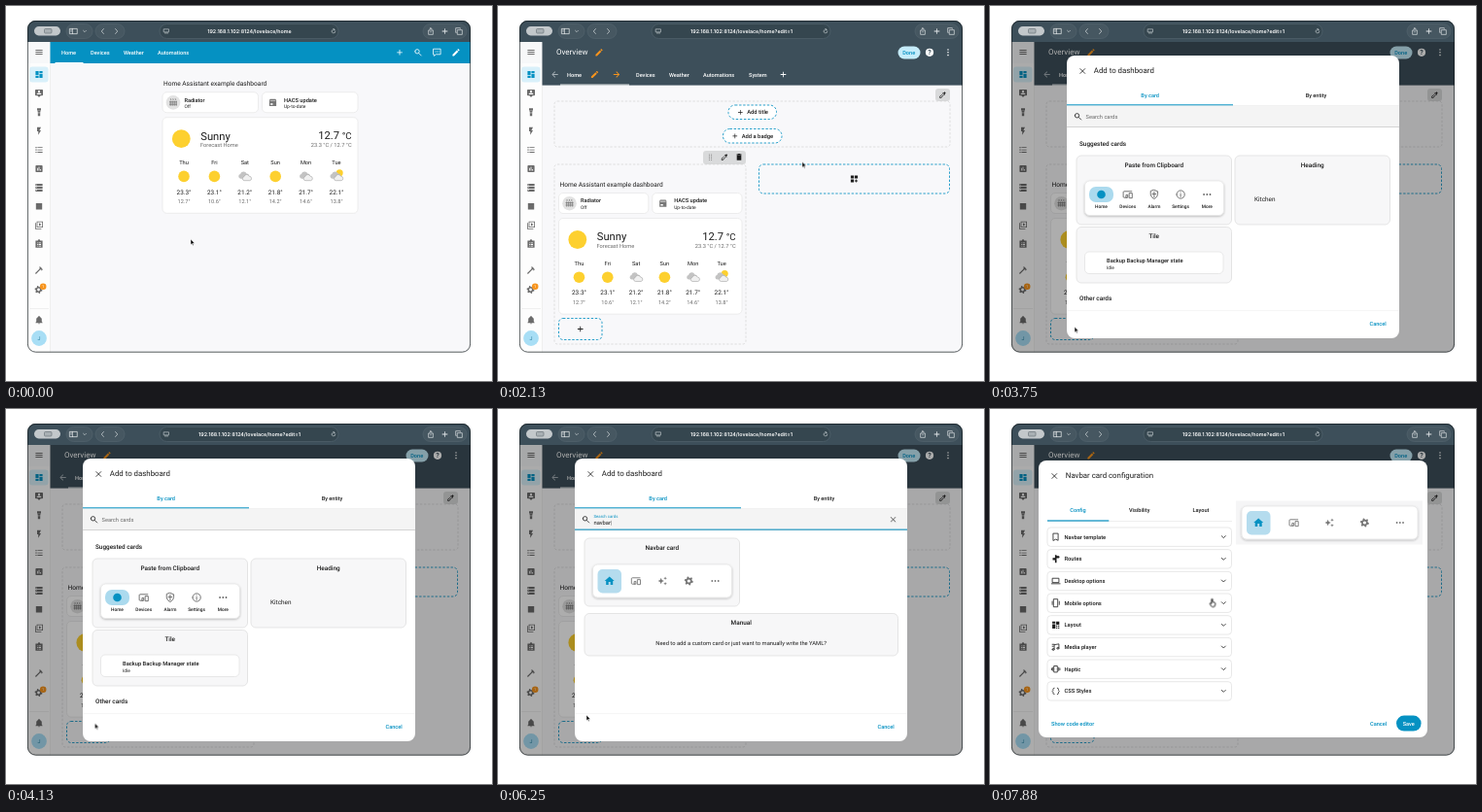
Animation, 500 px wide and 386 px high, one loop 8000 ms. Source, as an HTML page:

```html
<!DOCTYPE html>
<html lang="en">
<head>
<meta charset="utf-8">
<title>Dashboard editing</title>
<style>
html, body { margin: 0; width: 100%; height: 100%; overflow: hidden; background: #fff; }
svg { display: block; width: 500px; height: 386px; font-family: Roboto, sans-serif; text-rendering: geometricPrecision; }
.url { font-family: Inter, sans-serif; }
.line { fill: none; stroke-width: 2; stroke-linecap: round; stroke-linejoin: round; }
#pointer { animation: move 8s ease-in-out infinite; }
@keyframes move {
  0%, 3% { transform: translate(190px, 240px); }
  14.4%, 22% { transform: translate(464px, 46.5px); }
  32.5%, 46% { transform: translate(86.5px, 331px); }
  50%, 56% { transform: translate(91.5px, 323.5px); }
  60%, 78.7% { transform: translate(91px, 315px); }
  86.3%, 94% { transform: translate(182px, 176.5px); }
  98%, 100% { transform: translate(228.5px, 195.5px); }
}
</style>
</head>
<body>
<script>
const LOOP = 8000;
const BLUE = '#0591c2', DARK = '#3d4f5a', INK = '#1c1c1c', GRAY = '#6b6b6b', ORANGE = '#f7941d', SUN = '#fdd02f';
let css = '', rules = 0;

const gear = 'M' + Array.from({ length: 24 }, (_, i) => {
  const r = i % 4 < 2 ? 10 : 7.2, a = (i + .5) * Math.PI / 12;
  return (12 + r * Math.cos(a)).toFixed(2) + ' ' + (12 + r * Math.sin(a)).toFixed(2);
}).join('L') + 'ZM8.5 12a3.5 3.5 0 1 0 7 0a3.5 3.5 0 1 0-7 0Z';
const dots = (...spots) => spots.map(([x, y]) => `M${x - 2} ${y}a2 2 0 1 0 4 0a2 2 0 1 0-4 0Z`).join('');

const solid = {
  gear,
  dotsV: dots([12, 5], [12, 12], [12, 19]),
  dotsH: dots([5, 12], [12, 12], [19, 12]),
  menu: 'M3 6H21V8H3ZM3 11H21V13H3ZM3 16H21V18H3Z',
  board: 'M13 3V9H21V3ZM13 21H21V11H13ZM3 21H11V15H3ZM3 13H11V3H3Z',
  blocks: 'M3 3H11V11H3ZM13 3H21V11H13ZM3 13H11V21H3ZM16 13H18V16H21V18H18V21H16V18H13V16H16Z',
  person: 'M20 2A2 2 0 0 1 22 4V16A2 2 0 0 1 20 18H16L12 22 8 18H4A2 2 0 0 1 2 16V4A2 2 0 0 1 4 2ZM12 4.3a2.7 2.7 0 1 0 .01 0ZM18 15V14.1C18 12.1 14 11 12 11S6 12.1 6 14.1V15Z',
  torch: 'M7 2H17V6H7ZM7 7H17L15 11V22H9V11ZM11 12V15H13V12Z',
  flash: 'M7 2V13H10V22L17 10H13L17 2Z',
  list: 'M8 5H21V7H8ZM8 11H21V13H8ZM8 17H21V19H8ZM3 4.5H6V7.5H3ZM3 10.5H6V13.5H3ZM3 16.5H6V19.5H3Z',
  chart: 'M5 3H19A2 2 0 0 1 21 5V19A2 2 0 0 1 19 21H5A2 2 0 0 1 3 19V5A2 2 0 0 1 5 3ZM7 10V17H9V10ZM11 7V17H13V7ZM15 13V17H17V13Z',
  server: 'M3 2H21V8H3ZM5 4V6H7V4ZM3 9.5H21V15H3ZM5 11V13H7V11ZM3 16.5H21V22H3ZM5 18V20H7V18Z',
  square: 'M3 3H21V21H3Z',
  media: 'M2 6H4V20H18V22H2ZM6 2H22V18H6ZM8 4V16H20V4ZM12 6V14L18 10Z',
  clip: 'M9 3a3 3 0 0 1 6 0H21V21H3V3ZM7 8V10H9V8ZM11 8V10H17V8ZM7 12V14H9V12ZM11 12V14H17V12ZM7 16V18H9V16ZM11 16V18H17V16Z',
  hammer: 'M2 19.6 13.4 8.2 12.7 7.5 14.1 6.1 12 3.9C13.2 2.7 15.1 2.7 16.3 3.9L19.9 7.5 18.5 8.9H21.3L22 9.6 18.5 13.2 17.7 12.5V9.6L16.3 11 15.6 10.3 4.1 21.8Z',
  bell: 'M21 19V20H3V19L5 17V11C5 7.9 7 5.2 10 4.3V4A2 2 0 0 1 14 4V4.3C17 5.2 19 7.9 19 11V17ZM14 21A2 2 0 0 1 10 21Z',
  pencil: 'M20.7 7C21.1 6.6 21.1 6 20.7 5.6L18.4 3.3C18 2.9 17.4 2.9 17 3.3L15.1 5.1 18.9 8.9ZM3 17.3V21H6.8L17.8 9.9 14.1 6.2Z',
  pen: 'M14 8 16 10 7 19H5V17ZM17.7 3 14.4 6.3 13 4.9 11.6 6.3 13 7.7 3 16.2V21H7.8L16.4 11 17.8 12.4 19.2 11 17.8 9.6 21 6.4Z',
  plus: 'M19 13H13V19H11V13H5V11H11V5H13V11H19Z',
  right: 'M4 11V13H16L10.5 18.5 12 20 19.9 12 12 4 10.5 5.5 16 11Z',
  left: 'M20 11V13H8L13.5 18.5 12 20 4.1 12 12 4 13.5 5.5 8 11Z',
  house: 'M10 20V14H14V20H19V12H22L12 3 2 12H5V20Z',
  stars: 'M9 5 11 10 16 12 11 14 9 19 7 14 2 12 7 10ZM18.5 2 19.6 4.9 22.5 6 19.6 7.1 18.5 10 17.4 7.1 14.5 6 17.4 4.9ZM18.5 14 19.6 16.9 22.5 18 19.6 19.1 18.5 22 17.4 19.1 14.5 18 17.4 16.9Z',
  trash: 'M9 2H15L16 3.5H19V6H5V3.5H8ZM5.5 7H18.5V21H5.5Z',
  box: 'M5 3H19L21 6V21H3V6ZM5 6V7.5H19V6ZM6 14V18H12V14Z',
  sign: 'M10 2H14V4H20L22 7 20 10H14V22H10V15H4V9H10Z',
  grid: 'M3 3H11V8H3ZM13 3H21V11H13ZM3 10H11V21H3ZM13 13H16V16H13ZM18 13H21V16H18ZM13 18H16V21H13ZM18 18H21V21H18Z'
};
const line = {
  close: 'M6 6 18 18M18 6 6 18',
  down: 'M7 9.5 12 14.5 17 9.5',
  search: 'M4 9.5a5.5 5.5 0 1 0 11 0a5.5 5.5 0 1 0-11 0M14 14 20 20',
  chat: 'M3 3H21V17H9L4 21V17H3ZM8 10h.1M12 10h.1M16 10h.1',
  drag: 'M9 5v.1M15 5v.1M9 10v.1M15 10v.1M9 15v.1M15 15v.1M9 20v.1M15 20v.1',
  radiator: 'M3 11H21M5 9V20M10 9V20M15 9V20M20 9V20M3 17H21M6 3q2 2 0 3M12 3q2 2 0 3M18 3q2 2 0 3',
  devices: 'M9 19H4Q2 19 2 17V7Q2 5 4 5H21M16 9H22V20H16ZM9 13H12V19H9Z',
  shield: 'M12 2 20 5V11Q20 18 12 22 4 18 4 11V5ZM12 6V18M8 11H16',
  info: 'M3 12a9 9 0 1 0 18 0a9 9 0 1 0-18 0M12 11V17M12 7.5v.1',
  bookmark: 'M6 3H18V21L12 18 6 21Z',
  laptop: 'M4 5H20V16H4ZM1 19H23',
  phone: 'M7 2H17V22H7ZM3 8V16M21 8V16',
  music: 'M8 18V6L20 4V15M3 18a2.5 2.5 0 1 0 5 0a2.5 2.5 0 1 0-5 0M15 15a2.5 2.5 0 1 0 5 0a2.5 2.5 0 1 0-5 0M3 5H8M3 10H6',
  buzz: 'M8 4H16V20H8ZM4.5 8V16M19.5 8V16M1.5 10V14M22.5 10V14',
  braces: 'M8 4Q5 4 5 7V10L3 12 5 14V17Q5 20 8 20M16 4Q19 4 19 7V10L21 12 19 14V17Q19 20 16 20',
  panel: 'M2 5H22V19H2ZM9 5V19M5 9h1M5 12h1',
  back: 'M15 4 8 12 15 20',
  next: 'M9 4 16 12 9 20',
  reload: 'M19 12a7 7 0 1 1-3-6M12 2 16 6 12 9',
  share: 'M8 9H5V22H19V9H16M12 15V2M8 6 12 2 16 6',
  tabs: 'M8 8H22V22H8ZM4 16H2V2H16V4',
  page: 'M3 4H21V15H3ZM6 19H18'
};

const icon = (name, x, y, color = GRAY, size = 9.6) => {
  const at = `transform="translate(${x - size / 2} ${y - size / 2}) scale(${size / 24})"`;
  return solid[name]
    ? `<path ${at} d="${solid[name]}" fill="${color}" fill-rule="evenodd"/>`
    : `<path ${at} d="${line[name]}" class="line" stroke="${color}"/>`;
};
const text = (x, y, size, str, fill = INK, weight = 400, anchor = 'start', extra = '') =>
  `<text x="${x}" y="${y}" font-size="${size}" fill="${fill}" font-weight="${weight}" text-anchor="${anchor}" ${extra}>${str}</text>`;
const mid = (x, y, size, str, fill, weight) => text(x, y, size, str, fill, weight, 'middle');
const box = (x, y, w, h, r = 0, fill = 'none', stroke = 'none', extra = '') =>
  `<rect x="${x}" y="${y}" width="${w}" height="${h}" rx="${r}" fill="${fill}" stroke="${stroke}" stroke-width=".7" ${extra}/>`;
const dot = (x, y, r, fill) => `<circle cx="${x}" cy="${y}" r="${r}" fill="${fill}"/>`;
const dashed = (x, y, w, h, r, color = '#cfcfcf', fill = 'none') =>
  box(x, y, w, h, r, fill, color, `stroke-dasharray="2.4 1.7" style="stroke-width:${color === BLUE ? .85 : .6}px"`);

// Visible from one time to another, in ms
const show = (from, to, body, fade = 1, rise = 0) => {
  const id = 'on' + rules++, pct = ms => (ms / LOOP * 100).toFixed(4) + '%';
  const off = `{opacity:0;transform:translateY(${rise}px)}`, on = '{opacity:1;transform:none}';
  css += `@keyframes ${id}{` +
    (from ? `0%,${pct(from)}${off}${pct(from + fade)}` : '0%') +
    (to < LOOP ? `,${pct(to)}${on}${pct(to + fade)},100%${off}` : `,100%${on}`) + '}';
  return `<g style="animation:${id} 8s linear infinite">${body}</g>`;
};

const address = path => text(250.5, 28, 5.3, '192.168.1.102:8124/lovelace/' + path, '#fff', 600, 'middle', 'class="url"');

const cloud = (x, y, s, fill, stroke = 'none') =>
  `<path transform="translate(${x} ${y}) scale(${s})" d="M-4 4a2.8 2.8 0 0 1-.4-5.5 4 4 0 0 1 7.6-.6A3.1 3.1 0 0 1 4 4Z" fill="${fill}" stroke="${stroke}" stroke-width=".9"/>`;
const weather = (kind, x, y) => kind === 'sun' ? dot(x, y, 5.8, SUN) :
  (kind === 'mix' ? dot(x + 3.2, y - 3.6, 3.5, SUN) : '') + cloud(x - 1, y - 1, .85, '#c3c3c3') + cloud(x + 2.2, y + 1.4, .72, '#f0f0f0', '#a9a9a9');

const days = [
  ['Thu', 'sun', 23.3, 12.7], ['Fri', 'sun', 23.1, 10.6], ['Sat', 'cloud', 21.2, 12.1],
  ['Sun', 'sun', 21.8, 14.2], ['Mon', 'cloud', 21.7, 14.6], ['Tue', 'mix', 22.1, 13.8]
];

const cards = (x, y, w) => {
  const half = w / 2 - 2, x2 = x + w / 2 + 2, step = (w - 12.6) / 6, end = x + w - 6.3;
  const card = (cx, cy, cw, ch) => box(cx, cy, cw, ch, 4.5, '#fff', '#e6e6e6');
  return text(x + 1, y, 6.58, 'Home Assistant example dashboard') +
    card(x, y + 6.7, half, 21) + card(x2, y + 6.7, half, 21) +
    dot(x + 11, y + 17.4, 7.3, '#e2e2e2') + icon('radiator', x + 11, y + 17.2, '#777') + icon('box', x2 + 11, y + 17.4, '#777') +
    text(x + 22.4, y + 16.6, 5.6, 'Radiator', INK, 500) + text(x + 22.4, y + 23.4, 4.8, 'Off') +
    text(x2 + 22.4, y + 16.6, 5.7, 'HACS update', INK, 500) + text(x2 + 22.4, y + 23.4, 4.9, 'Up-to-date') +
    card(x, y + 32.7, w, 98.6) + dot(x + 19.3, y + 54.7, 9.4, SUN) +
    text(x + 39.3, y + 55.5, 11.2, 'Sunny') + text(x + 39, y + 63.2, 5.7, 'Forecast Home', GRAY) +
    text(end, y + 55.4, 11.2, '12.7 <tspan font-size="9.7" dy="-.6">°C</tspan>', INK, 400, 'end') +
    text(end, y + 63.2, 5.7, '23.3 °C / 12.7 °C', GRAY, 400, 'end') +
    days.map(([day, kind, hi, lo], i) => {
      const cx = x + 6.3 + step * (i + .5);
      return mid(cx, y + 81, 5.7, day) + weather(kind, cx, y + 93.4) +
        mid(cx, y + 111.5, 6.4, hi.toFixed(1) + '°') + mid(cx, y + 120.7, 5.6, lo.toFixed(1) + '°', GRAY);
    }).join('');
};

const chrome = () => {
  const w = '#e4e8ea', soft = '#465761', rim = '#52636d';
  return box(22, 15, 456, 22.5, 0, DARK) +
    box(29, 21, 27, 9.5, 4.7, '#c3c8cb') + box(39.5, 23.5, 7.5, 4.5, 1, '#a9b0b4', '#6d777d') +
    box(62, 18.5, 27, 15, 7.5, soft, rim) + icon('panel', 69.5, 26, w, 9) + icon('down', 81, 26, w, 7) +
    box(92, 18.5, 30, 15, 7.5, soft, rim) + icon('back', 99.5, 26, w, 7.5) + icon('next', 113.5, 26, w, 7.5) +
    box(158, 18.5, 184, 15, 7.5, '#35464f', rim) + icon('page', 165, 26, w, 6.5) + icon('reload', 337, 26, w, 6.5) +
    box(429, 18.5, 45, 15, 7.5, soft, rim) + icon('share', 437, 26, w, 8) + icon('plus', 451.5, 26, w, 9.5) + icon('tabs', 466, 26, w, 8);
};

const sidebar = () => {
  const names = ['board', 'person', 'torch', 'flash', 'list', 'chart', 'server', 'square', 'media', 'clip'];
  return box(22, 37, 23.5, 320, 0, '#fdfdfd') + box(22, 37, 23.5, 22, 0, '#f7f8f9') + box(45, 37, .5, 320, 0, '#e2e2e2') +
    icon('menu', 34, 47.5) + box(24, 62.5, 19.5, 16, 3, '#d9f0fa') +
    names.map((n, i) => icon(n, 34, 70.5 + 19.4 * i, i ? GRAY : BLUE, n === 'square' ? 8.5 : 9.6)).join('') +
    icon('gear', 33.5, 292) + icon('hammer', 34, 272) + dot(38.2, 288.8, 3.3, ORANGE) + mid(38.2, 290.3, 4, '1', '#fff') +
    box(24, 311, 20, .5, 0, '#e0e0e0') + icon('bell', 34, 323) + dot(34, 342, 7.9, '#a8def5') + mid(34, 344, 5.4, 'J', '#2a7fa0');
};

const home = () =>
  box(45.5, 37, 433, 22, 0, BLUE) + address('home') +
  [[57, 'Home'], [87, 'Devices'], [121, 'Weather'], [156, 'Automations']]
    .map(([x, s]) => text(x, 50, 5.6, s, '#fff', 500)).join('') +
  box(50.5, 58, 29, 1, 0, '#fff') +
  icon('plus', 405, 47.8, '#fff') + icon('search', 424, 47.8, '#fff') + icon('chat', 443.5, 47.8, '#fff') + icon('pencil', 463, 47.8, '#fff') +
  cards(161, 82, 201);

const tooltip = () =>
  dot(463, 47.8, 7.6, '#ffffff55') + box(439, 61, 39, 12, 2, '#e1e3e4') + mid(458.5, 68.6, 4.8, 'Edit dashboard', '#222');

const pill = (x, y, w, str) =>
  dashed(x, y, w, 14.5, 7, BLUE, '#fff') + icon('plus', x + 12.3, y + 7.3, INK, 8) + text(x + 19.2, y + 9.4, 5.8, str, INK, 500);

const edit = () =>
  box(45.5, 37, 433, 44.6, 0, DARK) + address('home?edit=1') +
  text(60, 50, 8, 'Overview', '#fff') + icon('pencil', 104, 47.8, ORANGE) +
  box(411.5, 41.5, 23, 13, 6.5, '#c5ecfa') + mid(422.7, 50, 5.6, 'Done', BLUE, 500) +
  dot(444, 47.8, 4.1, '#fff') + mid(444, 50.3, 7, '?', DARK, 700) + icon('dotsV', 463, 47.8, '#fff') +
  icon('left', 58.5, 70.5, '#a5afb5') + icon('pencil', 99.5, 70.5, ORANGE) + icon('right', 122, 70.5, ORANGE) +
  [[71, 'Home'], [142, 'Devices'], [176, 'Weather'], [211, 'Automations'], [258, 'System']]
    .map(([x, s]) => text(x, 72.5, 5.6, s, '#fff', 500)).join('') + icon('plus', 293.5, 70.5, '#fff') +
  box(64, 80.6, 71, 1, 0, '#fff') +
  box(450, 85, 15, 13, 3, '#d9dadb') + icon('pen', 457.5, 91.5, INK, 8.5) + dashed(58, 98, 407, 47, 3) +
  pill(237, 102, 49.5, 'Add title') + pill(231.5, 126.5, 60.5, 'Add a badge') +
  box(211, 149, 44, 14, 3, '#d9dadb') + icon('drag', 218.5, 155.5, '#555', 8.5) + icon('pen', 233, 155.5, INK, 8.5) + icon('trash', 248, 155.5, INK, 8.5) +
  dashed(58, 163, 197, 185, 3) + cards(62.5, 185.8, 188.5) +
  dashed(268.5, 163, 196, 30, 4.5, BLUE) + icon('blocks', 366.5, 178, INK) +
  show(2500, 3750, box(62.5, 321.5, 44.5, 22, 4.5, '#e9f2f7')) +
  dashed(62.5, 321.5, 44.5, 22, 4.5, BLUE) + icon('plus', 84.7, 332.5, INK);

const sheet = (x, y, w, h, title) =>
  box(x, y, w, h, 8, '#fff') + icon('close', x + 16.3, y + 16, INK) + text(x + 27.8, y + 18.3, 7.85, title);
const tray = (x, y, w, h) => box(x, y, w, h, 5, '#fff', '#e3e3e3', 'filter="url(#lift)"');
const frame = (x, y, w, h, title) => box(x, y, w, h, 5, '#f7f7f8', '#dcdcdc') + mid(x + w / 2, y + 11.8, 6.4, title, INK, 500);

const navbar = (x, y, w, gap) => tray(x, y, w, 34) + box(x + 5, y + 5, 24.5, 24.5, 5, '#b5dcee') +
  ['house', 'devices', 'stars', 'gear', 'dotsH'].map((n, i) => icon(n, x + 17.2 + gap * i, y + 17, i ? '#777' : BLUE, i ? 11 : 12)).join('');

const suggestions = () => {
  const items = [['', 'Home'], ['devices', 'Devices'], ['shield', 'Alarm'], ['info', 'Settings'], ['dotsH', 'More']];
  return text(92, 144.3, 6.4, 'Suggested cards', INK, 500) +
    frame(89, 154, 159.5, 71, 'Paste from Clipboard') + tray(97.5, 180, 143, 35.5) + box(102, 186, 25, 16, 7, '#abdaee') + dot(114.5, 194, 4.3, BLUE) +
    items.map(([n, s], i) => (n ? icon(n, 114.5 + 27.2 * i, 194, '#666', 11) : '') + mid(114.5 + 27.2 * i, 207.5, 4.8, s, INK, 500)).join('') +
    frame(252, 154, 159.5, 71, 'Heading') + text(272, 200.6, 6.4, 'Kitchen') +
    frame(89, 227.5, 159.5, 57.5, 'Tile') + box(97.5, 253, 142.5, 22.5, 4.5, '#fff', '#e0e0e0') +
    text(120, 263.6, 5.75, 'Backup Backup Manager state', INK, 500) + text(120, 270.7, 4.8, 'Idle') +
    text(92, 303.3, 6.4, 'Other cards', INK, 500);
};

const results = () =>
  frame(89, 133, 159.5, 70, 'Navbar card') + navbar(97.5, 160, 143, 27.2) +
  frame(89, 210.5, 322.5, 43.5, 'Manual') +
  mid(250.2, 242.7, 5.8, 'Need to add a custom card or just want to manually write the YAML?');

const typing = () => {
  const word = 'navbar', start = 5130, key = 125;
  return Array.from({ length: word.length + 1 }, (_, i) => show(
    i ? start + key * (i - 1) : 4500,
    i < word.length ? start + key * i : LOOP,
    text(98.5, 118.7, 5.8, word.slice(0, i) + '<tspan font-weight="300">|</tspan>'))).join('');
};

const addDialog = () =>
  sheet(79, 51, 342, 291, 'Add to dashboard') +
  mid(164.7, 94.4, 5.6, 'By card', BLUE, 500) + mid(335.5, 94.4, 5.6, 'By entity', INK, 500) +
  box(79, 102, 342, .5, 0, '#ddd') + box(79, 101.3, 171, 1.2, 0, BLUE) +
  box(79, 102.6, 342, 21.6, 0, '#f4f4f4') + box(79, 124, 342, .5, 0, '#aaa') + icon('search', 90.5, 113.8, INK) +
  show(0, 4500, text(98.5, 115.7, 5.7, 'Search cards', GRAY)) +
  show(4500, LOOP, text(98.5, 111.6, 4.3, 'Search cards', BLUE) + box(79, 123.6, 342, 1, 0, BLUE)) +
  typing() + show(5130, LOOP, icon('close', 406.5, 113.8, INK, 9)) +
  show(0, 5380, suggestions()) + show(5380, LOOP, results()) +
  box(79, 313.3, 342, .5, 0, '#ececec') + text(390.5, 329.3, 5.6, 'Cancel', BLUE, 500);

const configDialog = () => {
  const rows = [
    ['bookmark', 'Navbar template'], ['sign', 'Routes'], ['laptop', 'Desktop options'], ['phone', 'Mobile options'],
    ['grid', 'Layout'], ['music', 'Media player'], ['buzz', 'Haptic'], ['braces', 'CSS Styles']
  ];
  return sheet(50, 53, 400, 285, 'Navbar card configuration') +
    mid(90.5, 106.3, 5.6, 'Config', BLUE, 500) + mid(153.7, 106.3, 5.6, 'Visibility', INK, 500) + mid(217, 106.3, 5.6, 'Layout', INK, 500) +
    box(59, 115.2, 190, .5, 0, '#ddd') + box(59, 114.4, 63.3, 1.2, 0, BLUE) +
    rows.map(([n, s], i) => {
      const y = 131.7 + 22.67 * i;
      return box(59, y - 9.7, 189.5, 19.4, 3.5, '#fff', '#dedede') + icon(n, 67.7, y, INK) +
        text(76.5, y + 2, 5.75, s, INK, 500) + icon('down', 240.3, y, INK);
    }).join('') +
    box(253, 94.5, 192, 45, 0, '#f5f5f6') + navbar(259, 100, 181, 36.4) +
    text(63, 325.7, 5.7, 'Show code editor', BLUE, 500) + text(391, 325.7, 5.6, 'Cancel', BLUE, 500) +
    box(418, 315.6, 25.6, 16, 8, BLUE) + mid(430.8, 325.7, 5.6, 'Save', '#fff', 500);
};

const scrim = box(22, 37, 456, 320, 0, '#000', 'none', 'opacity=".32"');
const arrow = '<path d="M0 0V5.8L1.3 4.6 2.2 6.6 3.1 6.2 2.2 4.3H4Z" fill="#000" stroke="#fff" stroke-width=".5"/>';
const hand = '<path d="M-.7.6a.7.7 0 0 1 1.4 0V3.2l2 .5q.8.3.6 1.2L2.8 7.4q-.2.7-.9.7H.2q-.6 0-.9-.5L-2.2 5.3q-.4-.7.2-1 .6-.2.9.3l.4.5Z" fill="#fff" stroke="#000" stroke-width=".85"/>';

const scene =
  '<defs><clipPath id="win"><rect x="22" y="15" width="456" height="341.5" rx="8.5"/></clipPath>' +
  '<filter id="lift" x="-10%" y="-20%" width="120%" height="150%"><feDropShadow dx="0" dy="1" stdDeviation="1.3" flood-opacity=".25"/></filter></defs>' +
  '<g clip-path="url(#win)">' + box(22, 15, 456, 342, 0, '#f8f8fa') + chrome() + sidebar() +
  show(0, 1630, home()) + show(1130, 1630, tooltip()) + show(1630, LOOP, edit()) +
  show(3630, 7050, scrim, 110) + show(3630, 7050, addDialog(), 110, 5) +
  show(7390, LOOP, scrim, 110) + show(7390, LOOP, configDialog(), 110, 5) + '</g>' +
  box(22.4, 15.4, 455.2, 340.8, 8.2, 'none', '#11171b') +
  '<g id="pointer">' + show(0, 1100, arrow) + show(1100, 1850, hand) + show(1850, 2500, arrow) +
  show(2500, 3700, hand) + show(3700, 6650, arrow) + show(6650, LOOP, hand) + '</g>';

document.head.insertAdjacentHTML('beforeend', `<style>${css}</style>`);
document.body.insertAdjacentHTML('beforeend', `<svg viewBox="0 0 500 386">${scene}</svg>`);
</script>
</body>
</html>
```
